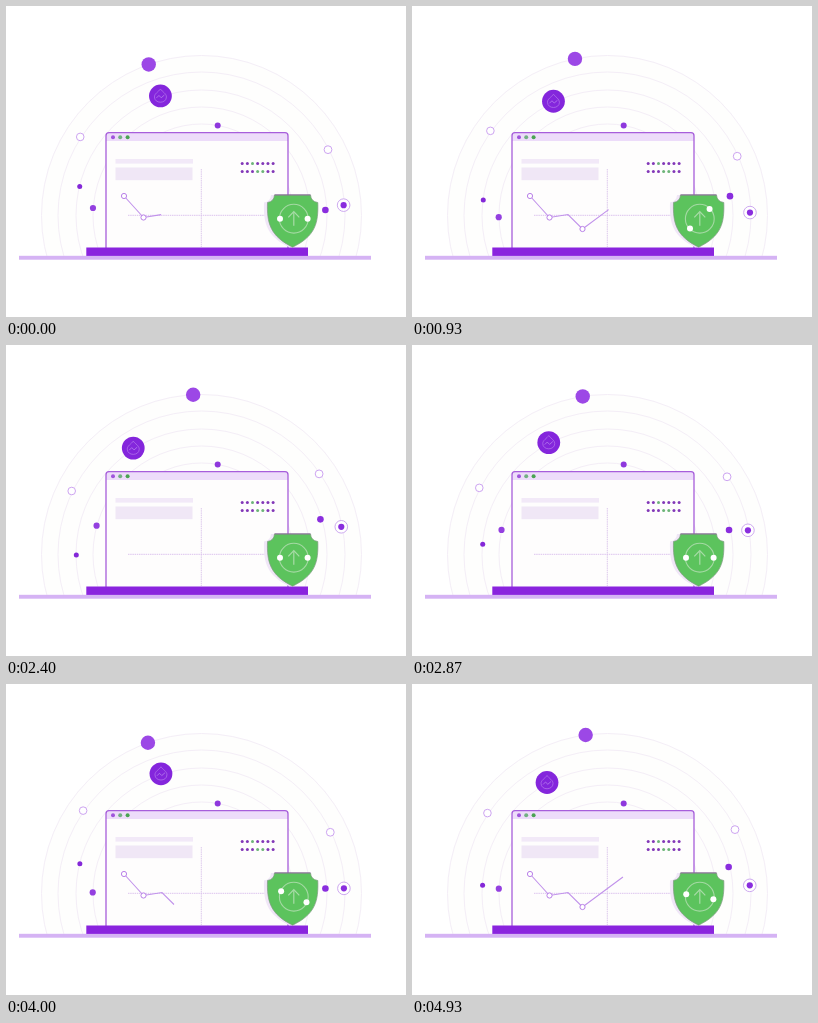
Animation of 400x311 px, one loop 5 s. Source, as an HTML page with a canvas:

```html
<!DOCTYPE html>
<html lang="en">
<head>
<meta charset="utf-8">
<title>Laptop security</title>
<style>
html, body { margin: 0; width: 100%; height: 100%; overflow: hidden; background: #fff; }
canvas { display: block; width: 400px; height: 311px; }
</style>
</head>
<body>
<canvas id="stage"></canvas>
<script>
const W = 400, H = 311, LOOP = 5000;
const HALF = 1846;         // one sweep of the orbiting dots, in ms
const RESET = 2270;        // the chart and the trail start over here
const CX = 195.5, CY = 209.5;

const canvas = document.getElementById('stage');
const ctx = canvas.getContext('2d');
const dpr = window.devicePixelRatio || 1;
canvas.width = W * dpr;
canvas.height = H * dpr;

const mod = (a, n) => ((a % n) + n) % n;

// Linear back-and-forth between 0 and 1, at 0 when t = start
function sweep(t, start) {
  const p = mod((t - start) / HALF, 2);
  return p > 1 ? 2 - p : p;
}

function paint(fill, stroke, width = 1) {
  if (fill) { ctx.fillStyle = fill; ctx.fill(); }
  if (stroke) { ctx.strokeStyle = stroke; ctx.lineWidth = width; ctx.stroke(); }
}

function circle(x, y, r, fill, stroke, width) {
  ctx.beginPath();
  ctx.arc(x, y, r, 0, Math.PI * 2);
  paint(fill, stroke, width);
}

function rect(x, y, w, h, fill) {
  ctx.fillStyle = fill;
  ctx.fillRect(x, y, w, h);
}

function line(points, stroke, width) {
  ctx.beginPath();
  points.forEach(([x, y]) => ctx.lineTo(x, y));
  paint(null, stroke, width);
}

// Point on an orbit; elevation in degrees above the horizontal, side -1 or 1
function orbit(r, elevation, side) {
  const a = elevation * Math.PI / 180;
  return [CX + side * r * Math.cos(a), CY - r * Math.sin(a)];
}

// First part of a polyline, up to the given length
function trim(points, length) {
  const out = [points[0]];
  for (let i = 1; i < points.length && length > 0; i++) {
    const [x0, y0] = points[i - 1], [x1, y1] = points[i];
    const d = Math.hypot(x1 - x0, y1 - y0);
    const k = Math.min(1, length / d);
    out.push([x0 + (x1 - x0) * k, y0 + (y1 - y0) * k]);
    length -= d;
  }
  return out;
}

function bezier(a, b, c, d, steps = 24) {
  return Array.from({ length: steps + 1 }, (_, i) => {
    const k = i / steps, m = 1 - k;
    return [0, 1].map(n =>
      m * m * m * a[n] + 3 * m * m * k * b[n] + 3 * m * k * k * c[n] + k * k * k * d[n]);
  });
}

const chart = [[118, 190], [137.5, 211.5], [156, 208.5], [170.5, 223], [219, 187]];
const chartDots = [[0, 0], [1, 29], [3, 68.2], [4, 128.5]];   // point, length at which it shows

const trail = [
  ...bezier([212, 119.5], [228, 90], [268, 118], [291, 91]),
  ...bezier([291, 91], [309, 68], [322, 38], [345, 25])
];

function backdrop() {
  ctx.save();
  ctx.beginPath();
  ctx.rect(0, 0, W, 250);
  ctx.clip();
  [160, 143.5, 125.5, 108.5, 91.5].forEach((r, i) =>
    circle(CX, CY, r, i ? null : '#fefefd', '#f4eef7', 1));
  ctx.restore();
}

function dropIcon(x, y) {
  circle(x, y, 11.4, '#8426dc');
  ctx.beginPath();
  ctx.moveTo(x, y - 7);
  ctx.bezierCurveTo(x + 2, y - 4, x + 6, y - 2.5, x + 6, y + 1);
  ctx.bezierCurveTo(x + 6, y + 8, x - 6, y + 8, x - 6, y + 1);
  ctx.bezierCurveTo(x - 6, y - 2.5, x - 2, y - 4, x, y - 7);
  paint(null, '#b070ea', 0.8);
  line([[x - 4, y + 2], [x - 1.5, y - 0.5], [x + 0.8, y + 1.8], [x + 4, y - 1]], '#b880ee', 0.8);
}

function orbiters(t) {
  const u = sweep(t, 167), v = sweep(t, 685);
  circle(...orbit(160, 68.65 + 23.25 * u, -1), 7.2, '#9c48e6');
  dropIcon(...orbit(126.4, 72.8 - 19.6 * u, -1));
  circle(...orbit(144.5, 37.5 - 12.3 * v, -1), 3.8, '#fff', '#cda4f1', 1);
  circle(...orbit(142.6, 22.9 + 12.4 * v, 1), 3.9, '#fff', '#cda4f1', 1);
  circle(...orbit(125.2, 15.2 - 19.6 * u, -1), 2.5, '#8428d8');
  circle(...orbit(108.8, -3.6 + 20.4 * v, -1), 3.1, '#9440e0');
  circle(...orbit(124, 0.75 + 19.9 * u, 1), 3.3, '#8a2ede');
  const [x, y] = orbit(142.5, -0.5 + 12.6 * v, 1);
  circle(x, y, 6.3, '#fff', '#c8a0ee', 0.9);
  circle(x, y, 3.1, '#8a2ede');
  circle(211.7, 119.5, 3, '#8f38dd');
}

function drawTrail(t) {
  const length = (t - 1000) * 0.158;
  if (length <= 0 || t >= RESET) return;
  ctx.setLineDash([2, 0.8]);
  line(trim(trail, length), '#dcc0f4', 1);
  ctx.setLineDash([]);
}

function browser() {
  ctx.beginPath();
  ctx.moveTo(100, 243);
  ctx.lineTo(100, 129.5);
  ctx.arcTo(100, 126.7, 103, 126.7, 3);
  ctx.lineTo(279, 126.7);
  ctx.arcTo(282, 126.7, 282, 129.7, 3);
  ctx.lineTo(282, 243);
  paint('#fefdfd');
  ctx.save();
  ctx.clip();
  rect(100, 126, 182, 9, '#eddcfa');
  ctx.restore();
  paint(null, '#a75edb', 1.3);

  circle(107, 131.2, 2, '#a055dc');
  circle(114.2, 131.2, 2, '#72b083');
  circle(121.6, 131.2, 2, '#4aa353');

  rect(109.5, 153, 77.5, 4.6, '#f2e9f8');
  rect(109.5, 161.5, 77, 12.7, '#f0e7f6');

  ctx.setLineDash([1.5, 0.7]);
  line([[195.3, 163], [195.3, 241]], '#dcc8ec', 1);
  line([[122, 209.3], [262, 209.3]], '#dcc4ee', 1);
  ctx.setLineDash([]);

  for (let row = 0; row < 2; row++) {
    for (let i = 0; i < 7; i++) {
      const green = row ? i === 3 || i === 4 : i === 2;
      circle(236.2 + i * 5.15, 157.6 + row * 8, 1.5, green ? '#6db578' : '#8338b8');
    }
  }
}

function drawChart(t) {
  const length = 0.058 * (mod(t - RESET, HALF * 2) - 615);
  if (length <= 0) return;
  line(trim(chart, length), '#c192eb', 1.1);
  chartDots.forEach(([i, from]) => {
    if (length >= from) circle(...chart[i], 2.6, '#fff', '#b980e8', 1);
  });
}

function base() {
  rect(13, 249.8, 352, 3.9, '#d5b3f4');
  rect(80.3, 241.5, 221.7, 8.4, '#8a24de');
}

function shieldPath() {
  ctx.beginPath();
  ctx.moveTo(268.5, 189);
  ctx.lineTo(304.5, 189);
  ctx.quadraticCurveTo(305, 195.5, 311.8, 196.5);
  ctx.bezierCurveTo(312.5, 217, 309.5, 230, 286.6, 241.2);
  ctx.bezierCurveTo(264, 230, 260.8, 217, 261.5, 196.5);
  ctx.quadraticCurveTo(268, 195.5, 268.5, 189);
  ctx.closePath();
}

function shield(t) {
  ctx.save();
  ctx.translate(-3.5, 0);
  shieldPath();
  paint('#f0e6f7');
  ctx.restore();
  shieldPath();
  paint('#5cc35d', '#7d9a80', 0.7);
  line([[268.5, 188.9], [304.5, 188.9]], '#8d6c9c', 1);

  const x = 287.8, y = 212.7;
  circle(x, y, 14.4, null, '#a5d9a4', 1.1);
  line([[x, y + 7], [x, y - 6.5]], '#a9dba8', 1.2);
  line([[x - 5.5, y - 1.3], [x, y - 7], [x + 5.5, y - 1.3]], '#a9dba8', 1.2);

  // One full turn in two seconds, then a rest
  const a = Math.min(mod(t - 180, HALF * 2), 2000) / 1000 * Math.PI;
  for (const s of [-1, 1]) {
    circle(x + s * 13.8 * Math.cos(a), y + s * 13.8 * Math.sin(a), 3, '#fff');
  }
}

function draw(t) {
  ctx.setTransform(dpr, 0, 0, dpr, 0, 0);
  rect(0, 0, W, H, '#fff');
  backdrop();
  drawTrail(t);
  orbiters(t);
  browser();
  drawChart(t);
  base();
  shield(t);
}

const began = performance.now();
function tick() {
  draw((performance.now() - began) % LOOP);
  requestAnimationFrame(tick);
}
tick();
</script>
</body>
</html>
```
